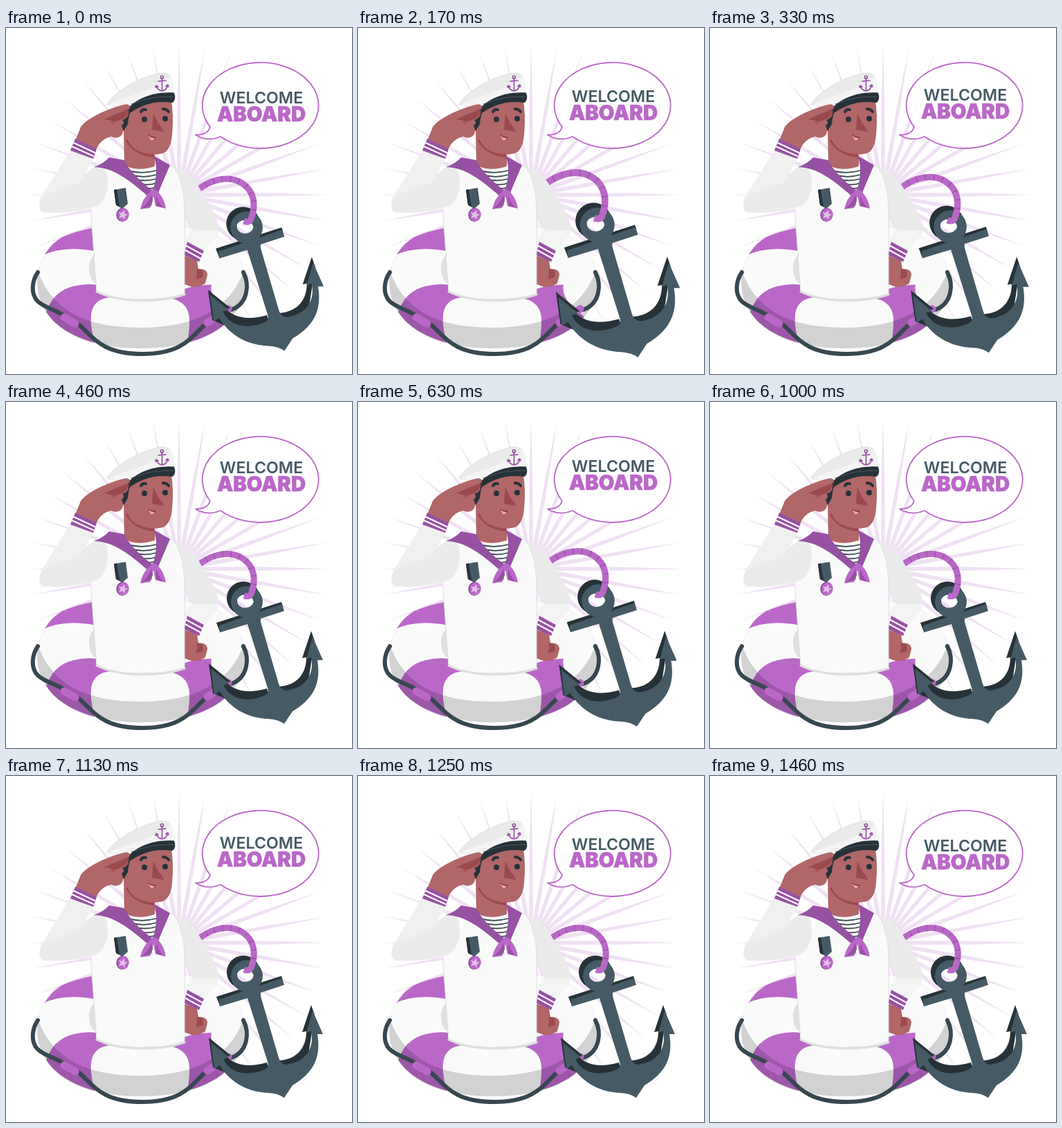
Write an HTML page that moves like this. It is 500 by 500 pixels and loops after 1500 ms.

```html
<!DOCTYPE html>
<html lang="en">
<head>
<meta charset="utf-8">
<title>Welcome aboard</title>
<style>
html, body { margin: 0; width: 100%; height: 100%; overflow: hidden; background: #fff; }
svg { display: block; width: 100vw; height: 100vh; }
text { font-family: Inter, sans-serif; text-anchor: middle; }
.light { fill: #ba68c8; }
.plum { fill: #9651a3; }
.white { fill: #fafafa; }
.grey { fill: #ebebeb; }
.skin { fill: #b16668; }
.shade { fill: #9a4a4d; }
.slate { fill: #455a64; }
.dark { fill: #263238; }
.line { fill: none; stroke-linecap: round; stroke-linejoin: round; }
</style>
</head>
<body>
<svg viewBox="0 0 500 500">
  <defs>
    <path id="buoy" d="M45 367C45 337 61 314 81 302Q120 284 195 282Q270 284 309 302C329 314 345 337 345 367C345 424 290 463 195 463C100 463 45 424 45 367Z"/>
    <clipPath id="buoyClip"><use href="#buoy"/></clipPath>
  </defs>

  <path id="rays" fill="#f0e1f4"/>

  <g id="lifebuoy">
    <g clip-path="url(#buoyClip)">
      <use href="#buoy" class="white"/>
      <path class="light" d="M50 330Q83 313 131 323V270H40Z"/>
      <path class="light" d="M56 417Q66 380 98 373Q115 369 131 371L154 389Q119 390 123 428Q125 448 133 470H60Z"/>
      <path class="light" d="M224 389L258 377Q275 371 297 371Q294 384 306 399L332 422L300 460L257 467Q265 450 265 426Q267 390 224 389Z"/>
      <path d="M40 330C56 402 105 433 195 433C285 433 336 397 349 330V475H40Z" opacity=".16"/>
      <use href="#buoy" class="line" stroke="#e0e0e0"/>
    </g>
    <path fill="#e0e0e0" d="M130 326Q119 334 120 350Q121 365 132 371Z"/>
    <g class="line" stroke="#37474f" stroke-width="6">
      <path d="M46 353C37 366 36 384 45 394C53 403 68 406 83 415"/>
      <path d="M343 353C352 370 350 398 326 407"/>
      <path d="M106 429C128 449 140 471 197 471C253 471 266 449 286 430"/>
    </g>
    <path class="line" d="M84 418L100 427M291 426L321 406" stroke="#ba68c8" stroke-width="11"/>
  </g>

  <g id="anchor">
    <path class="dark" fill-rule="evenodd" d="M319 283.500a24 24 0 0 1 48 0a24 24 0 0 1-48 0ZM334 287a12 12 0 0 0 24 0a12 12 0 0 0-24 0Z"/>
    <path class="dark" d="M304 319L398 289L400 295L312 326L309 332ZM293 378L325 404L318 405C332 419 352 421 377 414L382 428L330 434L299 421ZM441 331L428 370L434 369C434 393 420 410 394 411L394 420L435 415L446 345Z"/>
    <path class="slate" fill-rule="evenodd" d="M325 289a23 23 0 0 1 46 0a23 23 0 0 1-46 0ZM333 287a13 13 0 0 0 25 2a13 13 0 0 0-25-2Z"/>
    <path class="slate" d="M308 323L399 292L402 302L368 313V318L394 407Q397 417 406 417C432 413 446 395 441 369L434 371L443 339L458 373H450C456 408 443 430 414 447L402 465Q394 459 380 458C352 457 325 445 309 418L301 423L296 385L323 407L314 409C325 432 352 434 374 424Q381 421 378 413L349 321L309 333Z"/>
    <g class="line">
      <path d="M262 252C288 219 322 213 342 226C360 238 361 258 355 275Q353 283 344 280" stroke="#ba68c8" stroke-width="9" stroke-linecap="butt"/>
      <path d="M262 252C288 219 322 213 342 226C360 238 361 258 355 275" stroke="#9651a3" stroke-width="9" stroke-dasharray="1.2 11" stroke-linecap="butt"/>
    </g>
  </g>

  <g id="sailor">
    <path class="skin" d="M258 329L276 336L278 348Q291 348 291 357L288 369Q280 375 268 374L257 370Z"/>
    <path class="shade" d="M276 348L284 350L285 360L274 363L276 357Z"/>
    <path class="grey" d="M235 200C259 203 272 217 281 234Q300 262 307 284Q310 293 303 301L286 322L257 309L270 292L255 262Z"/>
    <path fill="#f4f4f4" d="M271 292L307 292Q306 298 303 301L286 322L258 309Z"/>
    <path class="plum" d="M262 309L286 322L279 338L257 328Z"/>
    <path class="line" d="M261 315L283 327M259 321L281 333" stroke="#fff" stroke-width="2"/>

    <path class="white" stroke="#e0e0e0" d="M132 202L172 194H215L240 199C254 213 258 240 258 270V386Q230 396 193 395Q155 394 131 382L122 257Z"/>
    <path class="line" d="M131 381Q157 393 193 393Q230 394 258 385" stroke="#dedede" stroke-width="3"/>

    <path class="grey" d="M128 200C143 198 148 209 147 225Q146 250 130 258C104 266 74 269 52 266Q45 258 51 244L93 177L126 188L114 211Z"/>
    <path fill="#f4f4f4" d="M93 177L126 188L108 222Q80 232 51 244Z" opacity=".6"/>

    <path class="skin" d="M170 145L171 197Q191 211 215 201V180Z"/>
    <path class="shade" d="M173 162Q183 184 214 187V180L180 160Z"/>
    <path class="skin" d="M175 112L238 100Q243 125 240 155Q238 176 227 181Q210 186 190 177Q177 171 173 152L167 145Z"/>
    <path class="dark" d="M166 127L185 110Q177 123 176 139L170 149L164 138Z"/>
    <path class="shade" d="M213 123L211 147L228 150Q227 145 220 138Z"/>
    <g class="dark"><circle cx="200" cy="132" r="4"/><circle cx="230" cy="131" r="4"/></g>
    <path class="line" d="M195 121Q197 117 202 118M227 117Q232 117 235 121" stroke="#263238" stroke-width="4"/>
    <path fill="#7d3437" d="M205 154Q211 158 216 157Q217 162 210 162Q206 160 205 154Z"/>
    <path fill="#f2a5a5" d="M205 155Q210 159 215 159Q213 163 209 162Z"/>

    <path class="grey" stroke="#e0e0e0" d="M146 111C151 97 190 70 225 65C238 64 243 76 242 96Q205 99 173 121Q160 111 146 111Z"/>
    <path fill="#f4f4f4" d="M146 111Q170 101 190 95Q220 84 238 70Q243 78 242 96Q205 98 173 121Q160 111 146 111Z"/>
    <path class="dark" d="M171 123C184 102 214 91 243 93.500Q247 104 240 108C213 104 194 112 174 126Z"/>
    <path class="line" d="M181 110Q209 98 242 99" stroke="#455a64" stroke-width="1"/>
    <g class="line" stroke="#9651a3" stroke-width="1.700">
      <circle cx="225.5" cy="71" r="2"/>
      <path d="M225.5 73V91M220 77L231 76M217 83Q219 90 225.5 91Q232 90 234 82M216 86L217 83L220 85M231 84L234 82L235 85"/>
    </g>

    <path class="skin" d="M100 163L108 143Q114 134 136 123Q158 113 174 110Q182 112 178 117L166 123Q178 120 177 125Q176 130 168 133Q173 137 167 141Q172 150 166 156Q160 161 152 157Q137 160 130 176Z"/>
    <path class="shade" d="M177 117L141 132Q151 132 158 138Q150 137 145 140L167 132Q180 126 177 117Z"/>
    <path class="plum" d="M100 160L131 175L126 189L93 177Z"/>
    <path class="line" d="M98 166L128 180M96 171.500L126 185" stroke="#fff" stroke-width="2"/>

    <path class="white" d="M173 200Q195 208 217 199V230L211 237Q184 218 173 200Z"/>
    <path class="line" d="M180 207Q198 211 217 206M183 213Q201 217 217 212M188 219Q203 222 217 218M195 225Q207 228 217 224M203 231Q210 233 216 230" stroke="#37474f" stroke-width="1.8"/>
    <path class="plum" d="M127 201Q141 196 149 187L171 191Q181 212 212 235L205 243C177 219 156 202 127 201ZM214 185L237 198L220 238L211 236Q218 222 217 200Z"/>
    <path class="light" d="M209 236Q214 230 219 236Q229 246 231 261L216 257L213 242Q211 255 208 260L194 262Q197 246 209 236Z"/>
    <path class="plum" d="M210 241L212 249L210 257L195 261Q206 254 210 241ZM217 241Q221 254 228 260L217 257Z"/>
    <circle class="light" cx="213" cy="239" r="5"/>

    <path class="slate" d="M156 234L173 231L176 254L168 261L159 256Z"/>
    <path class="dark" d="M156 234L160 233L164 258L159 256Z"/>
    <g transform="translate(169 270) rotate(15)">
      <ellipse class="plum" cx="-.7" rx="9" ry="10"/>
      <ellipse class="light" cx=".6" rx="8" ry="9.5"/>
      <path fill="#e3c3e9" d="M0-7L2-2L7-2L3 1L4.500 6L0 3L-4.500 6L-3 1L-7-2L-2-2Z"/>
    </g>
  </g>

  <path fill="#fff" stroke="#ba68c8" stroke-width="1.800" stroke-linejoin="round" d="M295 143A84 62 0 1 1 310 157Q290 165 274 154.500Q291 155 295 143Z"/>
  <g id="greeting">
    <text class="slate" x="369" y="109.700" font-size="23.200" font-weight="600">WELCOME</text>
    <text class="light" x="369" y="135.200" font-size="29.300" font-weight="900" stroke="#ba68c8" stroke-width=".6">ABOARD</text>
  </g>
</svg>
<script>
const LOOP = 1500, PHASE = 18;
const PIVOT_X = 374, PIVOT_Y = 340;
const LIFT = 10;

let rays = '';
for (let i = 0; i < 36; i++) {
  const angle = i * Math.PI / 18, c = Math.cos(angle), s = Math.sin(angle);
  const point = (r, w) => `${(250 + r * c - w * s).toFixed(1)} ${(241 + r * s + w * c).toFixed(1)}`;
  rays += `M${point(20, -3)}L${point(130, -2.4)}L${point(218, 0)}L${point(130, 2.4)}L${point(20, 3)}Z`;
}
document.getElementById('rays').setAttribute('d', rays);

// Two beats followed by a rest: [share of loop, scale].
const beats = [[0, 1], [.1, 1.1], [.3, 1], [.4, 1], [.5, 1.1], [.6, 1], [1, 1]];

function beatScale(p) {
  const i = beats.findIndex(([end]) => p < end);
  const [p0, s0] = beats[i - 1], [p1, s1] = beats[i];
  return s0 + (s1 - s0) * (p - p0) / (p1 - p0);
}

const anchor = document.getElementById('anchor');
const greeting = document.getElementById('greeting');
const start = performance.now();

function draw() {
  const p = (performance.now() - start + PHASE) % LOOP / LOOP;
  anchor.setAttribute('transform',
    `translate(${PIVOT_X} ${PIVOT_Y}) scale(${beatScale(p)}) translate(${-PIVOT_X} ${-PIVOT_Y})`);
  // The greeting rises for half the loop and sinks back.
  greeting.setAttribute('transform', `translate(0 ${-LIFT * (1 - Math.abs(1 - 2 * p))})`);
  requestAnimationFrame(draw);
}
draw();
</script>
</body>
</html>
```
